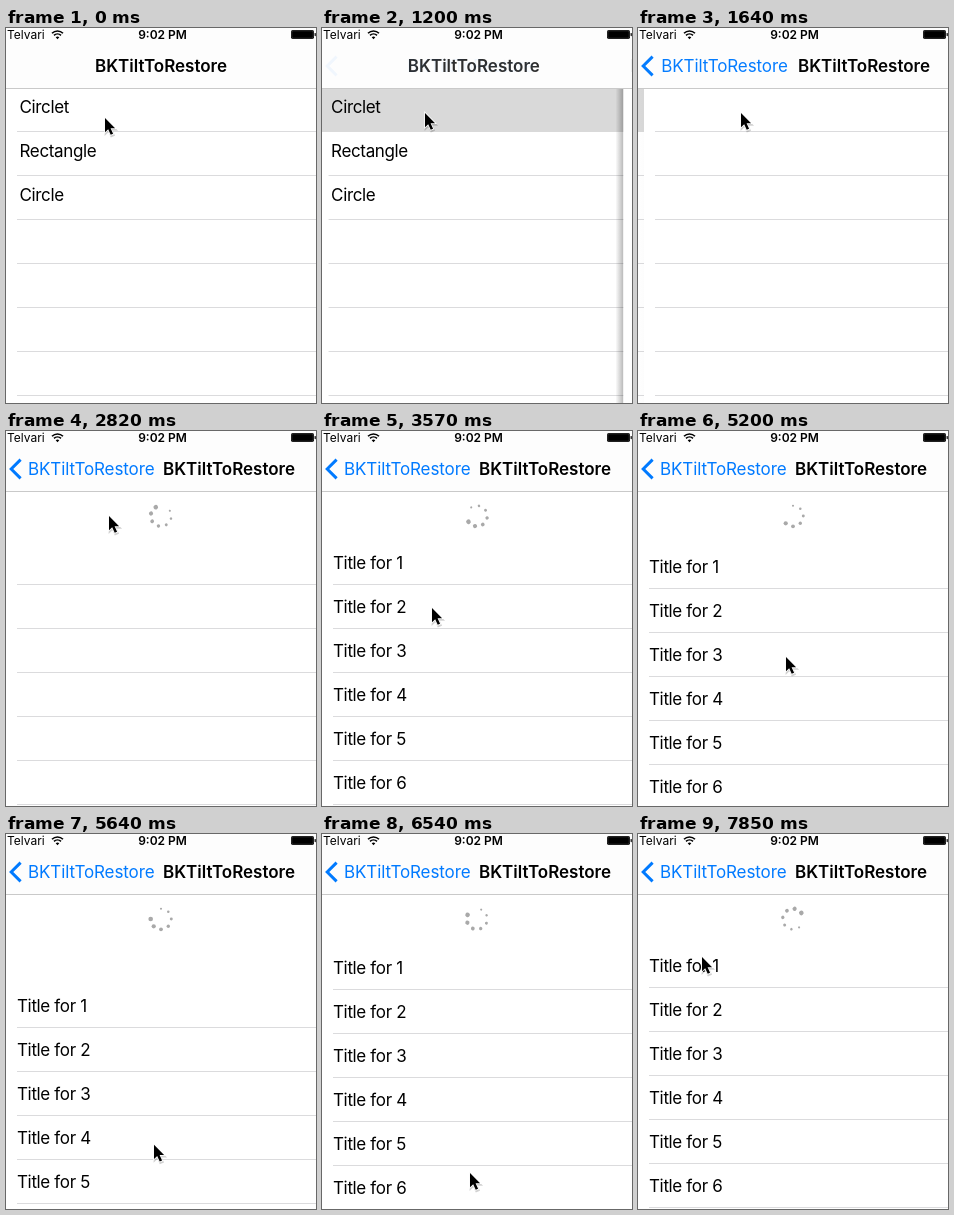
An HTML page for the animation above (8000 ms loop, 310 by 375 pixels).

```html
<!DOCTYPE html>
<html lang="en">
<head>
<meta charset="utf-8">
<title>Pull to refresh</title>
<style>
  html, body { margin: 0; width: 100%; height: 100%; overflow: hidden; background: #fff; }
  svg { display: block; width: 310px; height: 375px; font: 17px Inter, "Liberation Sans", sans-serif; }
  .row { letter-spacing: -.35px; }
  .bold { font-weight: 600; text-anchor: middle; }
  .status { font-size: 12px; }
  .line { fill: #dbdbdd; }
</style>
</head>
<body>
<svg viewBox="0 0 310 375">
  <defs>
    <linearGradient id="shade">
      <stop offset="0" stop-color="#000" stop-opacity="0"/>
      <stop offset="1" stop-color="#000" stop-opacity=".28"/>
    </linearGradient>
  </defs>
  <rect width="310" height="375" fill="#fff"/>

  <g id="menu">
    <g id="menuLines"></g>
    <rect id="pressed" x="-10" y="60" width="420" height="44" fill="#d9d9d9"/>
    <g id="menuText"></g>
  </g>

  <g id="page">
    <rect id="edge" x="-8" y="60" width="8" height="315" fill="url(#shade)"/>
    <rect y="60" width="320" height="315" fill="#fff"/>
    <g id="spinner"></g>
    <g id="table">
      <rect id="cells" y="60" width="320" height="400" fill="#fff"/>
      <g id="tableLines"></g>
      <g id="tableText"></g>
    </g>
  </g>

  <rect width="310" height="60" fill="#fdfdfd"/>
  <rect y="60" width="310" height="1" fill="#c9c9c9"/>
  <text id="oldTitle" class="bold" y="44">BKTiltToRestore</text>
  <text id="newTitle" class="bold" y="44">BKTiltToRestore</text>
  <g id="back" fill="#007aff">
    <path d="M14.6 28.6 5.2 38l9.4 9.4" fill="none" stroke="#007aff" stroke-width="3"/>
    <text id="backText" y="44" letter-spacing="-.1">BKTiltToRestore</text>
  </g>

  <text class="status" x="1" y="11">Telvari</text>
  <g fill="none" stroke="#000" stroke-width="1.6">
    <path d="M46 5.2a7.8 7.8 0 0 1 11 0M48 7.4a5 5 0 0 1 7 0"/>
    <path d="M51.5 11.2 49.7 9.3a2.6 2.6 0 0 1 3.6 0z" fill="#000" stroke="none"/>
  </g>
  <text class="status bold" x="156.5" y="11">9:02 PM</text>
  <rect x="285" y="2" width="23" height="9" rx="1.8"/>
  <rect x="285.8" y="2.8" width="21.4" height="7.4" rx="1.2" fill="none" stroke="#777" stroke-width=".4"/>
  <rect x="308.6" y="5" width="1.2" height="3.2" rx=".6"/>

  <g id="cursor">
    <path d="M0 0v14.2l3.2-3 2.5 5.6 2.4-1-2.5-5.5h4.5z" transform="translate(.6 1.4)"
          fill="none" stroke="#000" stroke-opacity=".18" stroke-width="2"/>
    <path d="M0 0v14.2l3.2-3 2.5 5.6 2.4-1-2.5-5.5h4.5z" stroke="#fff" stroke-width="1.6" paint-order="stroke"/>
  </g>
</svg>

<script>
const LOOP = 8000, STEPS = 54, TICK = LOOP / STEPS;
const PUSH = 1158, FIRST_SPIN = 1650, LOADED = 3550, CLOSE = 3640, DRAG = 4741, RELEASE = 6452;
const OPEN = 50, ROW = 44;

// time, x, y of the pointer tip
const POINTER = [
  [0, 99, 90], [296, 103, 85], [2963, 103, 85], [3407, 110, 177],
  [4148, 110, 177], [4593, 148, 110], [DRAG, 148, 110], [5185, 148, 226],
  [5778, 148, 339], [6815, 148, 339], [7556, 76, 168], [7704, 68, 140], [7852, 64, 123]
];

const $ = id => document.getElementById(id);
const clamp = v => Math.max(0, Math.min(1, v));
const ease = v => { v = clamp(v); return v * v * (3 - 2 * v); };
const move = (id, x, y = 0) => $(id).setAttribute('transform', `translate(${x} ${y})`);
const show = (id, opacity) => $(id).setAttribute('opacity', clamp(opacity));

function add(parent, tag, attrs, text = '') {
  const el = document.createElementNS('http://www.w3.org/2000/svg', tag);
  for (const k in attrs) el.setAttribute(k, attrs[k]);
  el.textContent = text;
  $(parent).append(el);
  return el;
}

for (const id of ['menuLines', 'tableLines'])
  for (let i = 0; i < 8; i++)
    add(id, 'rect', { class: 'line', x: 11, y: 103 + ROW * i, width: 400, height: 1 });

['Circlet', 'Rectangle', 'Circle'].forEach((name, i) =>
  add('menuText', 'text', { class: 'row', x: 13.5, y: 85 + ROW * i }, name));

for (let i = 0; i < 8; i++)
  add('tableText', 'text', { class: 'row', x: 11, y: 88 + ROW * i }, `Title for ${i + 1}`);

// dots run clockwise from the top, growing
const dots = Array.from({ length: 7 }, (_, i) => {
  const a = (i * 45 - 90) * Math.PI / 180;
  return add('spinner', 'circle', {
    cx: 10.3 * Math.cos(a), cy: 10.3 * Math.sin(a), r: 1.05 + i * .21, fill: '#a9a9a9'
  });
});

function pointerAt(t) {
  const i = POINTER.findIndex(k => k[0] > t);
  if (i < 0) return POINTER[POINTER.length - 1].slice(1);
  const [t0, x0, y0] = POINTER[i - 1], [t1, x1, y1] = POINTER[i];
  const f = (t - t0) / (t1 - t0);
  return [x0 + (x1 - x0) * f, y0 + (y1 - y0) * f];
}

function pushAt(t) {
  if (t < PUSH) return 0;
  if (t > PUSH + 520) return 1;
  const s = (t - PUSH) * .0125;
  return 1 - (1 + s) * Math.exp(-s);
}

// rubber band of a scroll view
const stretch = d => 568 * (1 - 1 / (Math.max(0, d) * .55 / 568 + 1));

function offsetAt(t, y) {
  if (t < CLOSE) return OPEN * ease((t - FIRST_SPIN) / 300);
  if (t < DRAG) return OPEN * (1 - ease((t - CLOSE) / 320));
  if (t < RELEASE) return stretch(y - 117);
  return OPEN + 51 * Math.exp((RELEASE - t) / 20.6);
}

function draw(t) {
  const [x, y] = pointerAt(t);
  const p = pushAt(t), q = 1 - p;
  const offset = offsetAt(t, y);
  const loaded = t >= LOADED;

  move('cursor', x, y);
  move('menu', -96 * p);
  show('pressed', t >= PUSH ? 1 : 0);
  move('page', p < 1 ? (p ? 316 * q : 400) : 0);
  show('edge', q * 2);

  move('oldTitle', 155 - 69 * p);
  show('oldTitle', 1 - p * 4);
  move('newTitle', 223 + 158 * q);
  show('newTitle', p);
  move('backText', 22 + 66 * q);
  show('back', p);

  move('table', 0, Math.round(offset));
  show('cells', loaded ? 1 : 0);
  show('tableText', loaded ? 1 : 0);

  const pulling = t >= DRAG && t < RELEASE;
  const start = t < DRAG ? FIRST_SPIN : RELEASE;
  const turn = pulling ? 0 : .36 * (t - start);
  const count = pulling ? Math.floor(offset / 9) : t >= FIRST_SPIN ? 7 : 0;
  $('spinner').setAttribute('transform', `translate(155 85) rotate(${turn})`);
  dots.forEach((dot, i) => dot.setAttribute('opacity', i < count ? 1 : 0));
}

const begin = performance.now();
function frame() {
  const t = (performance.now() - begin) % LOOP;
  draw(Math.min(STEPS - 1, Math.floor((t + 5) / TICK)) * TICK);
  requestAnimationFrame(frame);
}
frame();
</script>
</body>
</html>
```
